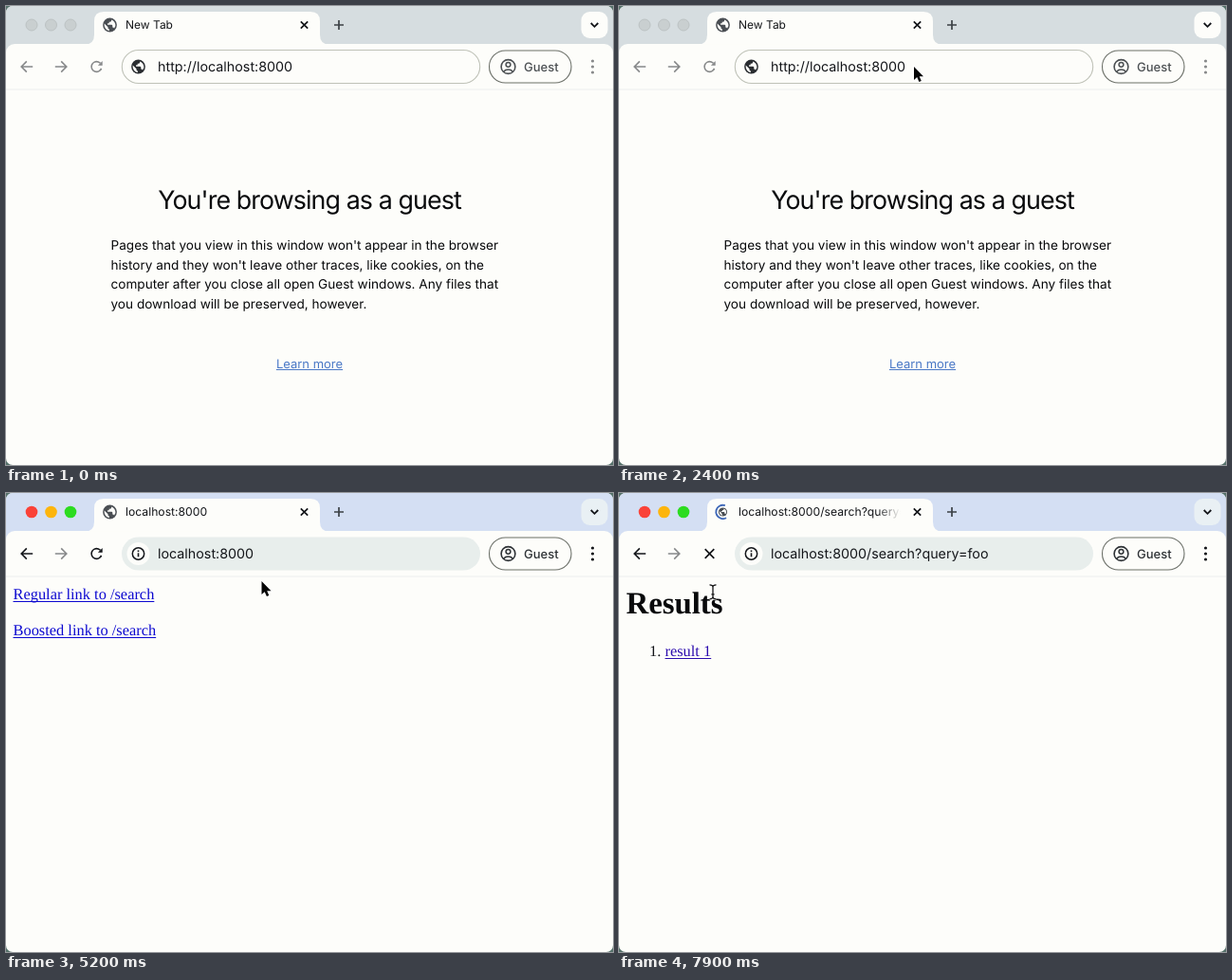
An HTML page with a canvas that plays this animation: 640 by 484 pixels, repeating every 8 s.

```html
<!DOCTYPE html>
<html lang="en">
<head>
<meta charset="utf-8">
<title>Browser window</title>
<style>
html, body { margin: 0; width: 100%; height: 100%; overflow: hidden; background: #fdfdfa; }
canvas { display: block; width: 640px; height: 484px; }
</style>
</head>
<body>
<canvas id="stage" width="640" height="484"></canvas>
<script>
const ctx = document.getElementById('stage').getContext('2d');
const LOOP = 8000;
const CURSOR_IN = 1950, FOCUS = 2900, HOME = 4000, MOVE = 4600, TURN = 5200, REST = 5900;
const CLICK = 7100, RESULTS = 7200, FIRST = 7300;
const PAPER = '#fdfdfa', INK = '#14161a', GREY = '#87898a', LINK = '#0c08d0';
const SANS = 'Inter, "Liberation Sans", sans-serif';
const SERIF = '"Liberation Serif", "Noto Serif", serif';
const SEARCH = 'localhost:8000/search?query=foo';

function text(str, x, y, size, opt = {}) {
  ctx.font = `${opt.weight || 400} ${size}px ${opt.family || SANS}`;
  ctx.letterSpacing = (opt.spacing || 0) + 'px';
  ctx.textAlign = opt.align || 'left';
  ctx.fillStyle = opt.color || INK;
  ctx.fillText(str, x, y);
  return ctx.measureText(str).width;
}

function link(str, x, y, size, opt) {
  const w = text(str, x, y, size, opt);
  const left = opt.align === 'center' ? x - w / 2 : x;
  ctx.fillRect(left, Math.floor(y) + 2, w, 1);
}

function box(x, y, w, h, r, fill, stroke, width = 1) {
  ctx.beginPath();
  ctx.roundRect(x, y, w, h, r);
  paint(fill, stroke, width);
}

function disc(x, y, r, fill, stroke, width = 1) {
  ctx.beginPath();
  ctx.arc(x, y, r, 0, Math.PI * 2);
  paint(fill, stroke, width);
}

function paint(fill, stroke, width) {
  if (fill) { ctx.fillStyle = fill; ctx.fill(); }
  if (stroke) { ctx.strokeStyle = stroke; ctx.lineWidth = width; ctx.stroke(); }
}

// Draws SVG path data around a local origin.
function shape(d, x, y, fill, stroke, width = 1.6, scale = 1) {
  ctx.save();
  ctx.translate(x, y);
  ctx.scale(scale, scale);
  const p = new Path2D(d);
  if (stroke) { ctx.strokeStyle = stroke; ctx.lineWidth = width; ctx.stroke(p); }
  if (fill) { ctx.fillStyle = fill; ctx.fill(p); }
  ctx.restore();
}

const cross = (x, y, r, color, width) =>
  shape(`M${-r} ${-r}L${r} ${r}M${r} ${-r}L${-r} ${r}`, x, y, null, color, width);

function globe(x, y, color, scale = 1) {
  disc(x, y, 7.4 * scale, color);
  shape('M-5.8-1.6L-2 2.2V3.4L-.6 4.8V5.9C-4 5.6-6.2 2.2-5.8-1.6Z' +
    'M1.6-5.6C4.4-4.6 6.2-2 5.9 1L4.6 3.6C4.2 2.9 3.6 2.6 2.8 2.6V.6L2-.2H-2.4V-1.7H-.8V-3.2H.7L1.6-4.2Z',
    x, y, PAPER, null, 0, scale);
}

function spinner(t) {
  const loaded = t >= RESULTS;
  const turn = (t - CLICK) / 1000 * Math.PI * 2 * (loaded ? 1 : -0.6);
  globe(109.5, 20, '#4a4e53', 0.62);
  ctx.beginPath();
  ctx.arc(109.5, 20, 7.2, turn + 2.3, turn + 2.3 + (loaded ? 4 : 1.6));
  paint(null, loaded ? '#3f68b8' : GREY, 1.9);
}

function tabStrip(t, focused) {
  ctx.fillStyle = focused ? '#d4dff3' : '#d6dde0';
  ctx.fillRect(0, 0, 640, 48);
  box(0, 40, 640, 50, [9, 9, 0, 0], PAPER);
  const lights = ['#fa4238', '#fdb50c', '#2cdc20'];
  lights.forEach((c, i) => focused
    ? disc(27 + i * 20.5, 20, 6.3, c)
    : disc(27 + i * 20.5, 20, 6, '#c9cfd0', '#bcc2c3'));
  shape('M83 40.5Q93 40.5 93 30.5V16Q93 6 103 6H321Q331 6 331 16V30.5Q331 40.5 341 40.5Z', 0, 0, PAPER);

  if (t >= CLICK) spinner(t);
  else globe(109.5, 20, '#4a4e53');

  if (t < HOME) text('New Tab', 126, 24, 12);
  else if (t < RESULTS) text('localhost:8000', 126, 24, 12.2);
  else {
    ctx.save();
    ctx.beginPath();
    ctx.rect(126, 8, 171, 26);
    ctx.clip();
    const fade = ctx.createLinearGradient(272, 0, 297, 0);
    fade.addColorStop(0, INK);
    fade.addColorStop(1, 'rgba(20,22,26,0)');
    text(SEARCH, 126, 24, 12.2, { color: fade });
    ctx.restore();
  }
  cross(314.5, 20, 3.7, INK, 1.7);
  shape('M-5 0H5M0-5V5', 351, 20, null, '#3c4146', 1.7);
  box(606.5, 6, 28, 28, 9, focused ? '#e9f0f4' : PAPER);
  shape('M-3.8-2L0 1.8L3.8-2', 620.5, 20, null, INK, 1.8);
}

function toolbar(t, focused) {
  const home = t >= HOME;
  ctx.fillStyle = '#eef0ef';
  ctx.fillRect(0, 87.5, 640, 1);

  const arrow = 'M6.2 0H-5.4M-.2-5.6L-5.8 0L-.2 5.6';
  shape(arrow, 22, 64, null, home ? INK : GREY);
  ctx.save();
  ctx.translate(58, 64);
  ctx.scale(-1, 1);
  shape(arrow, 0, 0, null, GREY);
  ctx.restore();

  const tool = focused ? INK : GREY;
  if (t >= CLICK) cross(95.5, 64, 4.8, INK, 1.7);
  else {
    ctx.beginPath();
    ctx.arc(95.5, 64, 5.4, 0.35, Math.PI * 2 - 0.75);
    paint(null, tool, 1.6);
    shape('M6.2-6V-1.2H1.4Z', 95.5, 64, tool);
  }

  if (home) {
    box(122, 46.5, 378, 35, 17.5, '#e8eeec');
    disc(139.5, 64, 12, PAPER);
    disc(139.5, 64, 6.2, null, INK, 1.5);
    ctx.fillStyle = INK;
    ctx.fillRect(138.7, 63.3, 1.6, 4);
    ctx.fillRect(138.7, 60.4, 1.6, 1.7);
  } else {
    box(122.3, 46.5, 377.4, 35, 17.5, PAPER, focused ? '#23579f' : '#bfc2b8', focused ? 2.3 : 1.1);
    if (focused) {
      ctx.fillStyle = '#a9cde6';
      ctx.fillRect(160, 55, 143, 18);
    }
    globe(139.5, 64, '#2a2d31');
  }
  const url = !home ? 'http://localhost:8000' : t < RESULTS ? 'localhost:8000' : SEARCH;
  text(url, 160, 69, 14.3);

  box(509.5, 47, 86.5, 34, 17, PAPER, '#6c7069', 1.1);
  const who = focused ? '#2e3236' : '#4c5053';
  disc(529.5, 64, 7.4, null, who, 1.6);
  disc(529.5, 61.8, 2.4, null, who, 1.5);
  shape('M-4.8 5.2C-2.6 2.4 2.6 2.4 4.8 5.2', 529.5, 64, null, who, 1.5);
  text('Guest', 546, 68.8, 13, { weight: 500, color: who });
  for (let y = 58; y <= 70; y += 6) disc(618.5, y, 1.6, tool);
}

function guestPage() {
  text("You're browsing as a guest", 320, 214, 26.8, { align: 'center', spacing: -0.9, color: '#08090b' });
  ["Pages that you view in this window won't appear in the browser",
    "history and they won't leave other traces, like cookies, on the",
    'computer after you close all open Guest windows. Any files that',
    'you download will be preserved, however.'
  ].forEach((line, i) => text(line, 110.5, 256.8 + i * 20.8, 13.6, { color: '#08090b' }));
  link('Learn more', 320, 381.5, 13, { align: 'center', color: '#4a78c6' });
}

function linksPage() {
  const style = { family: SERIF, color: LINK };
  link('Regular link to /search', 7.5, 112, 16.4, style);
  link('Boosted link to /search', 7.5, 150, 16.4, style);
}

function resultsPage(t) {
  text('Results', 7.5, 126.5, 32.8, { family: SERIF, weight: 700, color: '#08090b' });
  if (t < FIRST) return;
  text('1.', 32, 172, 16.4, { family: SERIF });
  link('result 1', 48.5, 172, 16.4, { family: SERIF, color: '#2c0cae' });
}

const mix = (a, b, k) => a + (b - a) * k;

function pointer(t) {
  if (t < CURSOR_IN || (t >= HOME - 100 && t < MOVE)) return null;
  if (t < MOVE) {
    const k = 1 - Math.max(0, 1 - (t - CURSOR_IN) / 400) ** 3;
    return [mix(420, 311, k), mix(484, 64, k)];
  }
  if (t < TURN) {
    const k = ((t - MOVE) / (TURN - MOVE)) ** 2;
    return [mix(311, 270, k), mix(64, 93, k)];
  }
  const k = 1 - Math.max(0, 1 - (t - TURN) / (REST - TURN)) ** 2;
  return [mix(270, 98.5, k), mix(93, 103.5, k)];
}

function cursor(t, at, hand) {
  if (!at) return;
  const [x, y] = at;
  const onUrl = t >= FOCUS && y > 46 && y < 82;
  if (hand) {
    shape('M-1.4 1C-1.4-1 1.4-1 1.6 1L2.4 5.4C3.6 4.6 4.8 5 5.2 6C6.4 5.4 7.4 5.8 7.8 6.9' +
      'C9 6.5 9.9 7.2 9.9 8.6V11.6C9.9 13.4 8.6 14.4 8.4 17H1.6C1.2 14.4-1.6 12.4-3.4 9.6' +
      'C-4.2 8-2.6 7-1.2 8.2L.2 9.4Z', x, y, '#ffffff', '#141414', 1.3);
    shape('M3.6 10V14M5.6 10V14M7.5 10V14', x, y, null, '#141414', 1);
  } else if (onUrl || t >= RESULTS) {
    const beam = 'M-3.5-7.5Q0-7.5 0-5V5Q0 7.5-3.5 7.5M3.5-7.5Q0-7.5 0-5M3.5 7.5Q0 7.5 0 5M-1.6 2.6H1.6';
    shape(beam, x + 0.5, y + 0.8, null, 'rgba(255,255,255,.8)', 2.8);
    shape(beam, x + 0.5, y + 0.8, null, '#151515', 1.3);
  } else {
    shape('M0 0V14L3.2 11.1L5.4 16L7.8 15L5.7 10.2H10Z', x, y, '#050505', '#ffffff', 1.8);
  }
}

function draw(t) {
  const focused = t >= FOCUS;
  ctx.textRendering = 'geometricPrecision';
  ctx.fillStyle = '#55716a';
  ctx.fillRect(0, 0, 640, 484);
  ctx.save();
  ctx.beginPath();
  ctx.roundRect(0, 0, 640, 484, 7);
  ctx.clip();
  ctx.fillStyle = PAPER;
  ctx.fillRect(0, 0, 640, 484);
  tabStrip(t, focused);
  toolbar(t, focused);

  if (t < HOME) guestPage();
  else if (t < RESULTS) linksPage();
  else resultsPage(t);

  const at = pointer(t);
  const hand = t >= TURN && t < RESULTS && at[0] < 156 && at[1] > 97;
  if (hand) {
    box(-2, 464, 209, 24, [0, 4, 0, 0], '#dae0ea', '#c8ccd2');
    text(SEARCH, 4, 479, 12.2, { color: '#33373b' });
  }
  cursor(t, at, hand);
  ctx.restore();
}

function frame() {
  draw(performance.now() % LOOP);
  requestAnimationFrame(frame);
}
frame();
</script>
</body>
</html>
```
